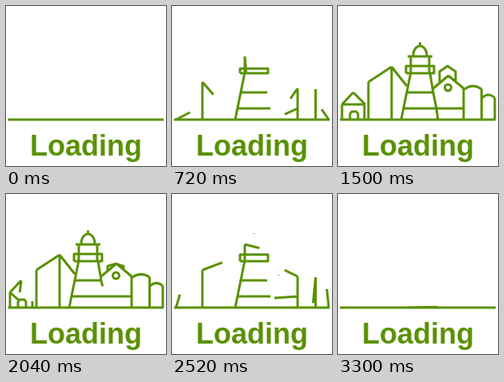
An HTML page for the animation above (3360 ms loop, 200 by 200 pixels).

```html
<!DOCTYPE html>
<html lang="en">
<head>
<meta charset="utf-8">
<title>Loading</title>
<style>
html, body { margin: 0; width: 100%; height: 100%; overflow: hidden; background: #fff; }
svg { display: block; width: 100vw; height: 100vh; }
#skyline { fill: none; stroke: #5a9104; stroke-width: 3; stroke-linejoin: round; }
text { font: bold 36px "Liberation Sans", Arial, sans-serif; fill: #5a9104; text-anchor: middle; }
</style>
</head>
<body>
<svg viewBox="0 0 200 200">
  <path id="skyline"/>
  <text x="100" y="187">Loading</text>
</svg>
<script>
const LOOP = 3360, STEP = 60, BUILT = 1500, LEAVE = 1860, GROUND = 142;
const SPAN = 370, GAP = 290;              // length of one move, delay to the next
const BEAT = [0, 1, 2, 3].map(i => 250 + GAP * i);
const skyline = document.getElementById('skyline');
let now, path;

const mix = (a, b, k) => a + (b - a) * k;

// Eased progress of a move, from 0 to 1.
function progress(start, span = SPAN) {
  const x = Math.min(1, Math.max(0, (now - start) / span));
  return x < 0.5 ? 2 * x * x : 1 - 2 * (1 - x) ** 2;
}

// Unfolds a chain like a ruler: each line is hinged at its first point and its
// free end travels there from the point before. The first point is not drawn.
function unfold(start, points, tempo = 1, bow = 0) {
  for (let i = 1; i < points.length - 1; i++) {
    const k = progress(start + (i - 1) * GAP * tempo, SPAN * tempo);
    if (!k) return;
    const [from, [x, y], to] = points.slice(i - 1, i + 2);
    const ex = mix(from[0], to[0], k), ey = mix(from[1], to[1], k);
    const last = i === points.length - 2;
    path += `M${x} ${y}Q${(x + ex) / 2} ${(y + ey) / 2 - (last ? bow : 0)} ${ex} ${ey}`;
  }
}

// Grows a polyline straight up from a base line.
function rise(start, base, points) {
  const k = progress(start);
  if (k) path += 'M' + points.map(([x, y]) => `${x} ${mix(base, y, k)}`).join('L');
}

// Draws an arc clockwise from the left, `turn` being its final angle.
function arc(start, span, x, y, rx, ry, turn) {
  const k = progress(start, span);
  if (!k) return;
  for (let i = 0; i <= 24; i++) {
    const a = Math.PI + turn * k * i / 24;
    path += `${i ? 'L' : 'M'}${x + rx * Math.cos(a)} ${y + ry * Math.sin(a)}`;
  }
}

function cottage() {
  unfold(BEAT[1], [[38, GROUND], [5, GROUND], [5, 123], [19, 108], [34, 123]]);
  unfold(BEAT[3], [[5, GROUND], [5, 123], [34, 123]]);
  rise(BEAT[3], GROUND, [[33, GROUND], [33, 123]]);
  rise(910, GROUND, [[15, GROUND], [15, 135], [17, 132], [23, 132], [25, 135], [25, GROUND]]);
}

function hall() {
  unfold(BEAT[0], [[79, GROUND], [38, GROUND], [38, 95], [67, 76], [67, GROUND]]);
  unfold(BEAT[2], [[38, 95], [67, 76], [86, 100]]);
}

function lighthouse() {
  unfold(0, [[125, GROUND], [79, GROUND], [91, 83]]);
  unfold(330, [[79, GROUND], [86, 108], [119, 108]]);
  unfold(330, [[79, GROUND], [82, 128], [123, 128]]);
  rise(510, 84, [[85, 84], [120, 84], [120, 75], [85, 75], [85, 84]]);
  unfold(BEAT[1], [[91, 84], [91, 84], [91, 63], [114, 63], [114, 84]], 0.5);
  unfold(1030, [[91, 74], [115, 84], [119, 108], [123, 128], [125, GROUND]], 0.5);
  unfold(880, [[102, 63], [102, 63], [87, 63]], 0.5);
  unfold(880, [[102, 63], [102, 63], [118, 63]], 0.5);
  arc(880, SPAN / 2, 102.5, 62, 8.5, 12, Math.PI);
  rise(720, 50, [[102.5, 50], [102.5, 45.5]]);
}

function church() {
  unfold(BEAT[0], [[125, GROUND], [157, GROUND], [157, 103], [138, 87], [119, 103]]);
  unfold(BEAT[1], [[157, GROUND], [157, 128], [123, 128]]);
  arc(BEAT[2] - 60, SPAN, 137.5, 102, 4, 4, 2 * Math.PI);
  rise(BEAT[3], 96, [[127, 96], [127, 82], [137, 75], [147, 82], [147, 94]]);
}

function silos() {
  const bow = 8 * progress(1000);
  rise(400, GROUND, [[179.5, GROUND], [179.5, 104]]);
  unfold(710, [[179.5, GROUND], [179.5, 104], [158, 104]], 1, bow);
  unfold(BEAT[1], [[179, GROUND], [196, GROUND], [196, 115], [180, 115]], 1, bow);
}

function draw(clock) {
  const t = Math.floor(clock % LOOP / STEP) * STEP;
  now = t < LEAVE ? Math.min(t, BUILT) : LOOP - STEP / 2 - t;
  path = `M2.5 ${GROUND}H197`;
  cottage();
  hall();
  lighthouse();
  church();
  silos();
  skyline.setAttribute('d', path);
}

const begin = performance.now();
function tick() {
  draw(performance.now() - begin);
  requestAnimationFrame(tick);
}
tick();
</script>
</body>
</html>
```
